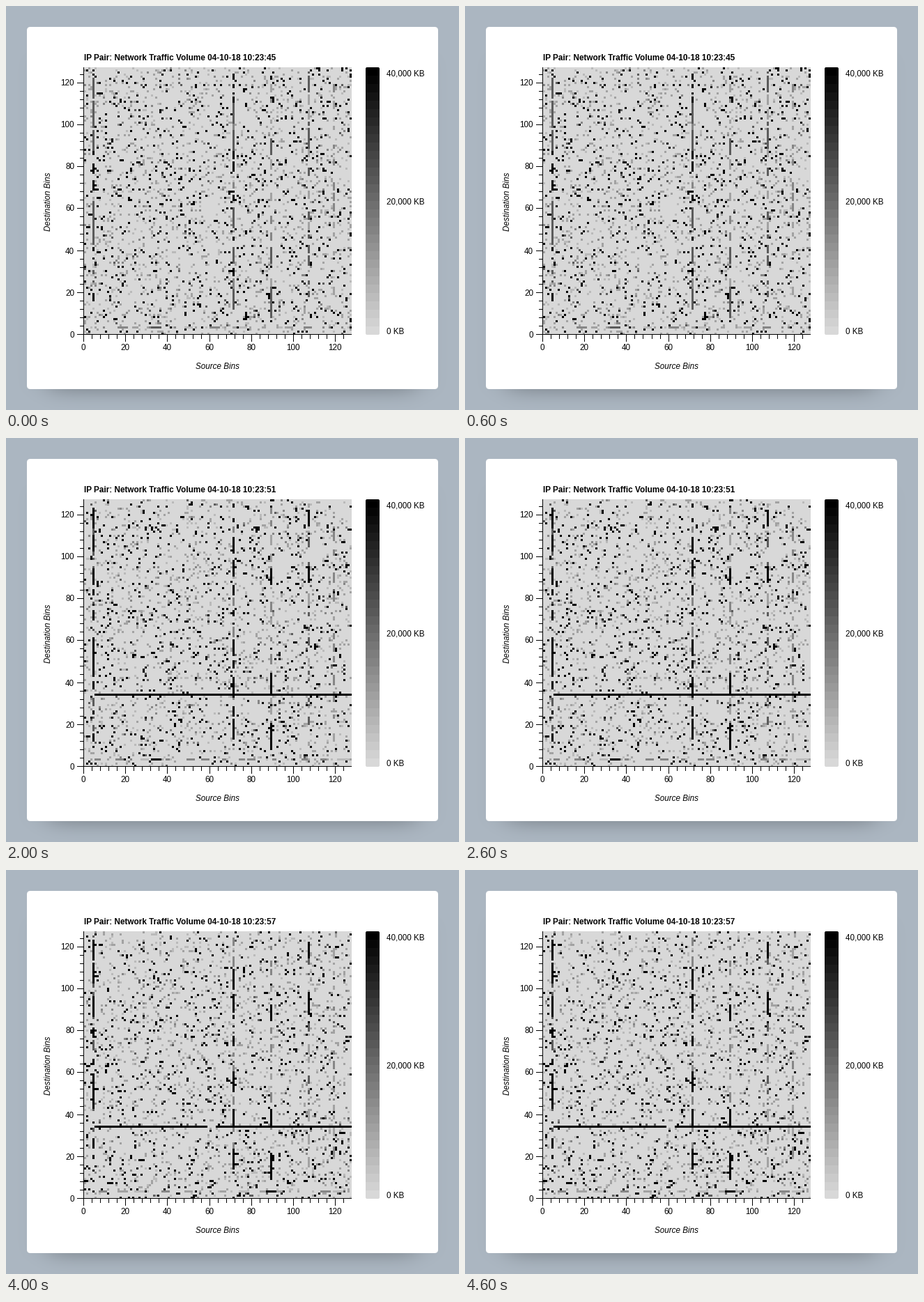
A matplotlib script for the animation above (5 s loop, 650 by 580 pixels).

```python
import numpy as np
import matplotlib.pyplot as plt
from matplotlib.animation import FuncAnimation
from matplotlib.patches import FancyBboxPatch, Rectangle

W, H, DPI = 650, 580, 100
LEFT, TOP, RIGHT, BOTTOM = 112, 88, 496, 472
BINS = 128
STEP = 3.01  # pixels per axis unit
PX = 72 / DPI

EMPTY, LIGHT, SOFT, MID, DARK, BLACK = 216, 186, 162, 134, 92, 0
NOISE = [EMPTY, LIGHT, SOFT, MID, DARK, BLACK]
NOISE_P = [0.852, 0.034, 0.046, 0.010, 0.006, 0.052]

# Busy source bins: dash shades and the centres of their solid runs
STRIPES = {
    4: ((DARK, BLACK), (118, 108, 92, 54, 47)),
    71: ((MID, BLACK), (105, 94, 57, 38, 18)),
    89: ((SOFT, MID), (90, 39, 17, 13)),
    107: ((SOFT, DARK), (120, 93)),
    119: ((SOFT, MID), ()),
}

# The sweep fills one destination row from the second scene on
SWEEP_ROW, SWEEP_START = 34, 5
SWEEP_GAPS = {1: ((31, 33), (55, 73), (88, 128)), 4: ((59, 63),)}


def add_dashes(cells, rng, shades, gap):
    pos = rng.integers(0, gap)
    while pos < len(cells):
        size = rng.integers(1, 6)
        cells[pos:pos + size] = rng.choice(shades)
        pos += size + rng.integers(1, gap)


def traffic(scene):
    """Grid of grey levels, indexed [destination, source]."""
    rng = np.random.default_rng(1023 + 17 * scene)
    grid = rng.choice(NOISE, size=(BINS, BINS), p=NOISE_P)
    strong = BLACK if scene else DARK

    for col, (shades, centres) in STRIPES.items():
        add_dashes(grid[12:126, col], rng, shades, 6 if col < 80 else 9)
        for centre in centres:
            mid, half = centre + rng.integers(-1, 2), rng.integers(4, 6)
            grid[mid - half:mid + half, col] = strong

    add_dashes(grid[3, 4:], rng, (LIGHT, SOFT, MID), 9)
    burst = 32 if scene in (0, 2) else 87
    grid[3, burst:burst + 5] = strong

    if scene:
        row = grid[SWEEP_ROW]
        row[SWEEP_START:] = BLACK
        for lo, hi in SWEEP_GAPS.get(scene, ()):
            row[lo:hi] = EMPTY
            add_dashes(row[lo:hi], rng, (SOFT, DARK), 9)
    return grid


def backdrop():
    """Blue-grey page with a soft shadow below the card."""
    def band(t, lo, hi, soft):
        return 1 / ((1 + np.exp((lo - t) / soft)) * (1 + np.exp((t - hi) / soft)))
    x, y = np.arange(W) + 0.5, np.arange(H) + 0.5
    shadow = np.outer(band(y, 70, 556, 7), band(x, 62, 588, 12))
    base = np.array([172, 183, 194]) / 255
    return base * (1 - 0.24 * shadow[..., None])


def label(x, y, text, size=11.6, **style):
    style.setdefault("va", "baseline")
    return ax.text(x, y, text, fontsize=size * PX, color="black", **style)


def rounded(x, y, w, h, r, **style):
    box = FancyBboxPatch((x, y), w, h, lw=0,
                         boxstyle=f"round,pad=0,rounding_size={r}", **style)
    return ax.add_patch(box)


def rule(x, y, w, h):
    ax.add_patch(Rectangle((x, y), w, h, fc="black", lw=0, zorder=3))


def gray_image(data, extent, origin):
    return ax.imshow(data, extent=extent, origin=origin, cmap="gray", vmin=0,
                     vmax=255, aspect="auto", interpolation="nearest", zorder=2)


plt.rcParams["font.family"] = "Liberation Sans"
fig = plt.figure(figsize=(W / DPI, H / DPI), dpi=DPI)
ax = fig.add_axes([0, 0, 1, 1])
ax.axis("off")

ax.imshow(backdrop(), extent=(0, W, H, 0), aspect="auto",
          interpolation="nearest", zorder=0)
rounded(30, 30, 590, 520, 5, fc="white", zorder=1)

heat = gray_image(traffic(0), (LEFT, RIGHT, BOTTOM, TOP), "lower")
levels = np.linspace(BLACK, EMPTY, 32)[:, None]
bar = gray_image(levels, (516, 536, BOTTOM, TOP), "upper")
bar.set_clip_path(rounded(516, TOP, 20, BOTTOM - TOP, 2, fc="none"))

ax.set_xlim(0, W)
ax.set_ylim(H, 0)

rule(LEFT - 1, TOP, 1, BOTTOM - TOP)
rule(LEFT - 1, BOTTOM - 1, RIGHT - LEFT + 1, 1)
for v in range(0, BINS, 4):
    major = v % 20 == 0
    size = 10 if major else 6
    x = round(LEFT - 1 + v * STEP)
    y = round(BOTTOM - 1 - v * STEP)
    rule(x, BOTTOM, 1, size)
    rule(LEFT - size, y, size, 1)
    if major:
        label(x, 494, str(v), ha="center")
        label(98, y + 4.5, str(v), ha="right")

label(303.5, 521, "Source Bins", ha="center", style="italic")
label(61, 280.5, "Destination Bins", ha="center", va="center", rotation=90,
      style="italic")
for y, text in ((100, "40,000 KB"), (284, "20,000 KB"), (471, "0 KB")):
    label(546, y, text)
title = label(112, 78, "", size=11.7, weight="bold")


def draw(scene):
    heat.set_data(traffic(scene))
    title.set_text("IP Pair: Network Traffic Volume "
                   f"04-10-18 10:23:{45 + 3 * scene}")
    return heat, title


anim = FuncAnimation(fig, draw, frames=5, interval=1000, repeat=True)
plt.show()
```
